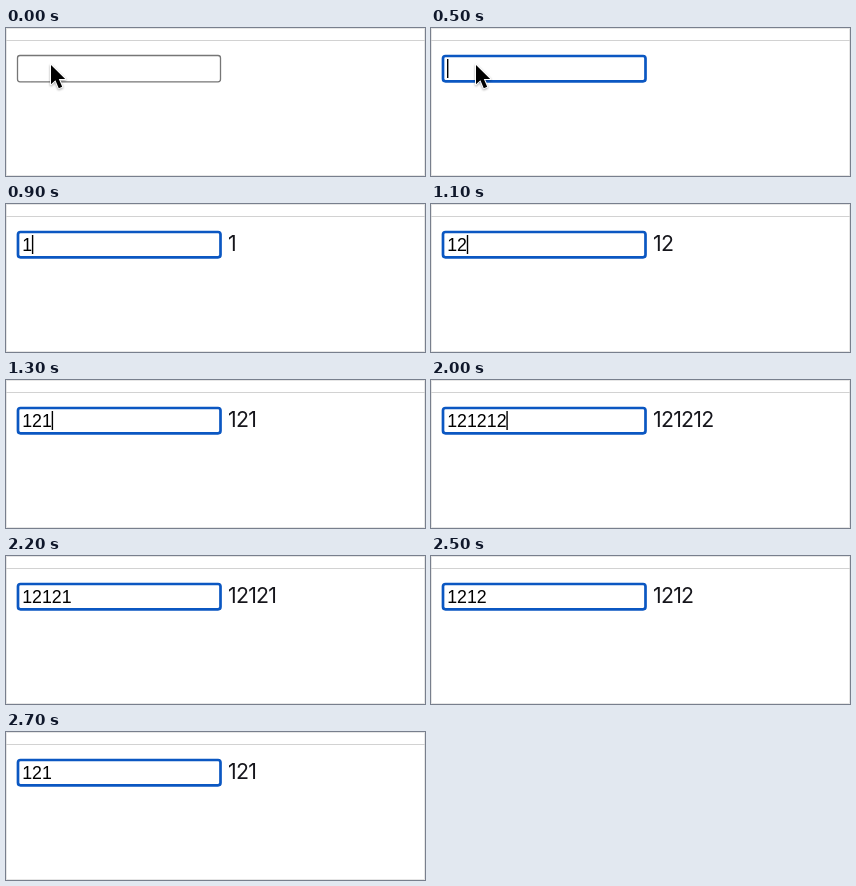
An HTML page for the animation above (2.8 s loop, 419x148 px).

```html
<!DOCTYPE html>
<html lang="en">
<head>
<meta charset="utf-8">
<title>Mirrored input</title>
<style>
  html, body { margin: 0; width: 100%; height: 100%; overflow: hidden; background: #fff; }
  svg { display: block; }
  #typed { font: 17.8px "Liberation Sans", Arial, sans-serif; }
  #echo { font: 21.3px Inter, sans-serif; letter-spacing: -.035em; fill: #16161c; }
</style>
</head>
<body>
<svg width="419" height="148" viewBox="0 0 419 148">
  <rect x=".5" y=".5" width="418" height="147" fill="#fff" stroke="#e6e6e6"/>
  <path d="M0 12.5H419" stroke="#d2d2d2"/>
  <rect id="field" fill="#fff"/>
  <text id="typed" x="16.2" y="46.6"></text>
  <text id="echo" x="222" y="46.8"></text>
  <rect id="caret" y="31" width="1.4" height="19"/>
  <g id="pointer">
    <path d="M45 37V56.3L49.4 52.3L52.8 60.2L56.2 58.7L52.8 51H59.2Z"
      stroke="#fff" stroke-width="2" stroke-linejoin="round" paint-order="stroke"
      style="filter:drop-shadow(0 1px 1px rgba(0,0,0,.35))"/>
  </g>
</svg>
<script>
const LOOP = 2800;
const FOCUS = 500;
const FIRST_KEY = 900;
const TEXT = "121212";
const ADVANCE = 17.8 * 0.556;

// [time, number of characters]
const lengths = [
  [0, 0], [FIRST_KEY, 1], [1100, 2], [1300, 3], [1400, 5], [1500, 6],
  [2100, 5], [2400, 4], [2600, 3]
];
// [time, caret visible]
const blinks = [
  [0, false], [FOCUS, true], [1700, false], [1900, true],
  [2200, false], [2300, true], [2500, false], [2600, true], [2700, false]
];

const $ = id => document.getElementById(id);
const [field, typed, echo, caret, pointer] =
  ["field", "typed", "echo", "caret", "pointer"].map($);

const valueAt = (steps, t) => steps.filter(([start]) => start <= t).pop()[1];
const show = (node, on) => node.setAttribute("visibility", on ? "visible" : "hidden");

function set(node, attributes) {
  for (const name in attributes) node.setAttribute(name, attributes[name]);
}

function render(t) {
  const count = valueAt(lengths, t);
  const focused = t >= FOCUS;
  typed.textContent = echo.textContent = TEXT.slice(0, count);
  set(field, focused
    ? { x: 12, y: 28, width: 202.5, height: 25.3, rx: 2.5, stroke: "#0b57c2", "stroke-width": 2.7 }
    : { x: 11.5, y: 27.5, width: 203, height: 26.3, rx: 2.5, stroke: "#767676", "stroke-width": 1.3 });
  caret.setAttribute("x", 16 + count * ADVANCE);
  show(caret, valueAt(blinks, t));
  show(pointer, t < FIRST_KEY);
}

const start = performance.now();
function tick() {
  render((performance.now() - start) % LOOP);
  requestAnimationFrame(tick);
}
render(0);
requestAnimationFrame(tick);
</script>
</body>
</html>
```
